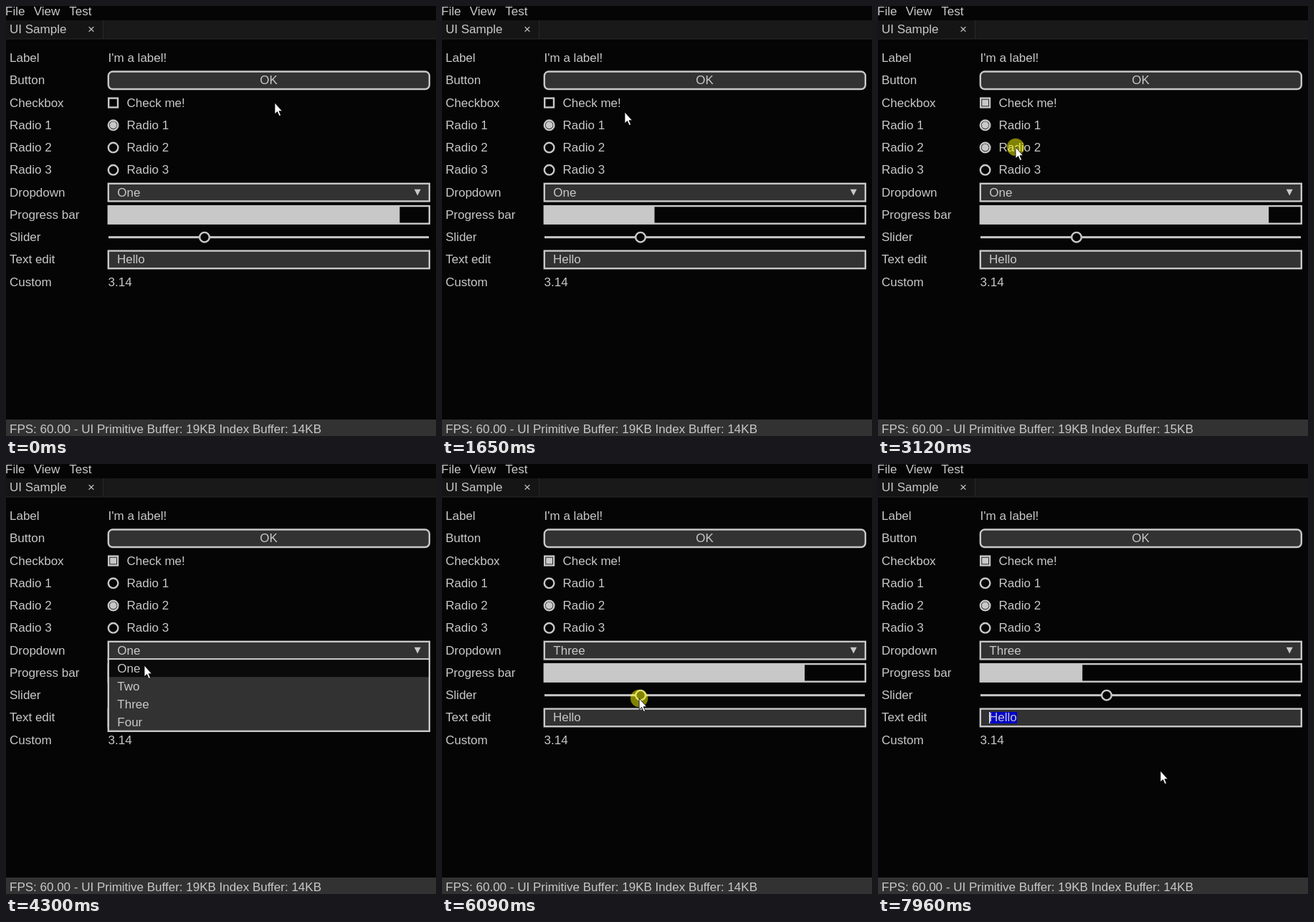
An HTML page for the animation above (8000 ms loop, 600 by 600 pixels).

```html
<!DOCTYPE html>
<html lang="en">
<head>
<meta charset="utf-8">
<title>UI Sample</title>
<style>
  html, body { margin: 0; width: 100%; height: 100%; overflow: hidden; background: #050505; }
  svg { display: block; width: 100vw; height: 100vh; }
  text { font: 17px "Liberation Sans", Arial, sans-serif; fill: #c8c8c8; white-space: pre; }
</style>
</head>
<body>
<svg id="stage" viewBox="0 0 600 600"></svg>
<script>
const LOOP = 8000;
const LIGHT = '#c8c8c8', FACE = '#323232', DARK = '#0a0a0a', BACK = '#050505';
const LEFT = 143, WIDTH = 447;
const TEXT_LEFT = 155, TEXT_RIGHT = 194;
const stage = document.getElementById('stage');

function add(tag, attrs, parent = stage) {
  const node = document.createElementNS('http://www.w3.org/2000/svg', tag);
  set(node, attrs);
  return parent.appendChild(node);
}
function set(node, attrs) {
  for (const name in attrs) node.setAttribute(name, attrs[name]);
}
function label(x, y, content, parent = stage, anchor = 'start') {
  const node = add('text', { x, y, 'text-anchor': anchor }, parent);
  node.textContent = content;
  return node;
}
const rowY = row => 72.5 + 31.27 * row;
const baseline = row => Math.round(rowY(row) + 5.5);
const rowLabel = (x, row, content, anchor) => label(x, baseline(row), content, stage, anchor);
const outline = fill => ({ fill, stroke: LIGHT, 'stroke-width': 2.4 });
const box = (x, y, width, height, fill, parent) => add('rect', { x, y, width, height, fill }, parent);
const frame = (y, height, fill, rx = 0, parent) =>
  add('rect', { x: 142.8, y, width: 448, height, rx, ...outline(fill) }, parent);
const rowFrame = (row, fill, rx) => frame(rowY(row) - 12.3, 24.6, fill, rx);
const ring = (cx, cy) => add('circle', { cx, cy, r: 6.8, ...outline(BACK) });
const show = (node, on) => set(node, { display: on ? 'inline' : 'none' });

// Menu, tab strip and status bar
label(-1, 13, 'File');
label(38.7, 13, 'View');
label(88.3, 13, 'Test');
box(0, 20, 600, 26, '#191919');
box(0, 20, 135, 26, '#151515');
box(135, 20, 1, 26, '#282828');
box(0, 45.5, 600, 1, '#282828');
label(5, 38, 'UI Sample');
label(119, 38, '×', stage, 'middle');
box(0, 577, 600, 23, FACE);
const status = label(5, 596, '');

['Label', 'Button', 'Checkbox', 'Radio 1', 'Radio 2', 'Radio 3', 'Dropdown',
 'Progress bar', 'Slider', 'Text edit', 'Custom'].forEach((name, row) => rowLabel(5, row, name));
rowLabel(142.6, 0, "I'm a label!");
rowLabel(142.6, 10, '3.14');

const button = rowFrame(1, FACE, 6);
rowLabel(366.5, 1, 'OK', 'middle');

add('rect', { x: 143.2, y: rowY(2) - 6.4, width: 12.8, height: 12.8, ...outline(BACK) });
const checkMark = box(145.2, rowY(2) - 4.4, 8.8, 8.8, LIGHT);
rowLabel(168.5, 2, 'Check me!');

const [dot1, dot2, dot3] = [1, 2, 3].map(i => {
  const cy = rowY(i + 2);
  ring(149.6, cy);
  rowLabel(168.5, i + 2, 'Radio ' + i);
  return add('circle', { cx: 149.6, cy, r: 5, fill: LIGHT });
});
show(dot3, false);

rowFrame(6, FACE);
const choice = rowLabel(155.3, 6, 'One');
add('path', { d: 'M569.7 255.8h9l-4.5 8.6z', fill: LIGHT });

rowFrame(7, BACK);
const bar = box(LEFT, rowY(7) - 12.3, 0, 24.6, LIGHT);

box(LEFT, rowY(8) - 1.5, WIDTH, 3, LIGHT);
const knob = ring(277, rowY(8));

rowFrame(9, FACE);
const selection = box(TEXT_LEFT, 346, 0, 16, '#0000c8');
rowLabel(155, 9, 'Hello');
const caret = box(TEXT_LEFT, 346, 1.3, 16, '#fff');

const ITEM = 25, POPUP_TOP = 272.4;
const popup = add('g', {});
frame(POPUP_TOP, 4 * ITEM + 0.4, FACE, 0, popup);
const hover = box(144, 0, 445.4, ITEM - 1, DARK, popup);
['One', 'Two', 'Three', 'Four'].forEach((name, i) => label(155.3, 291 + ITEM * i, name, popup));

const halo = add('circle', { r: 12.2, fill: '#ffff00', opacity: 0.5 });
const pointer = add('path', {
  d: 'M0 0V15.8L3.5 12.5l2.8 6 2.3-1L6 11.7H10.5z', fill: '#fff', stroke: '#000', 'stroke-width': 0.8
});

// The pointer's visits. A click is held until leaving, a drag while travelling there.
const HOLD = 230;
const visit = (arrive, leave, x, y, action) => ({ arrive, leave, x, y, action });
const tour = {
  start: visit(0, 180, 375, 135),
  button: visit(808, 1110, 380, 105, 'click'),
  detour: visit(1650, 1810, 255, 148),
  checkbox: visit(2050, 2420, 164, 135, 'click'),
  radio: visit(3040, 3290, 192, 197, 'click'),
  dropdown: visit(3700, 3900, 192, 258, 'click'),
  firstItem: visit(4300, 4360, 193, 281),
  thirdItem: visit(4610, 5080, 188.5, 333, 'click'),
  knob: visit(5940, 6080, 275, 327),
  knobEnd: visit(6400, 6500, 317, 327, 'drag'),
  text: visit(6810, 6950, 209, 350),
  textEnd: visit(7270, 7340, 41, 352, 'drag'),
  rest: visit(7850, LOOP, 394, 428)
};
const visits = Object.values(tour);

const clamp = (v, low, high) => Math.min(high, Math.max(low, v));
const ease = u => u * u * (3 - 2 * u);

function pointerAt(t) {
  const i = visits.findIndex(v => t < v.leave);
  const to = visits[i], from = visits[i - 1] || to;
  const u = ease(clamp((t - from.leave) / (to.arrive - from.leave || 1), 0, 1));
  return {
    x: i ? from.x + (to.x - from.x) * u : to.x,
    y: i ? from.y + (to.y - from.y) * u : to.y,
    held: to.action === 'drag' || (to.action === 'click' && t >= to.leave - HOLD) ? to : null
  };
}

function render(t) {
  const { x, y, held } = pointerAt(t);

  set(bar, { width: WIDTH * Math.abs(Math.sin(1.14 + t / 1000)) });
  set(button, { fill: held === tour.button ? DARK : FACE });
  show(checkMark, t >= tour.checkbox.leave - HOLD);
  show(dot1, t < tour.radio.leave);
  show(dot2, t >= tour.radio.leave - HOLD);
  status.textContent =
    `FPS: 60.00 - UI Primitive Buffer: 19KB Index Buffer: ${held === tour.radio ? 15 : 14}KB`;

  const item = Math.floor((y - POPUP_TOP) / ITEM);
  show(popup, t >= tour.dropdown.leave && t < tour.thirdItem.leave);
  show(hover, item >= 0);
  set(hover, { y: POPUP_TOP + 0.8 + ITEM * item });
  choice.textContent = t < tour.thirdItem.leave ? 'One' : 'Three';

  set(knob, { cx: 2 + pointerAt(clamp(t, tour.knob.leave, tour.knobEnd.arrive)).x });

  const editing = t - tour.text.leave;
  const caretX = clamp(pointerAt(Math.min(t, tour.textEnd.arrive)).x, TEXT_LEFT, TEXT_RIGHT);
  show(selection, editing >= 0);
  set(selection, { x: caretX, width: TEXT_RIGHT - caretX });
  show(caret, editing >= 0 && Math.floor(editing / 500) % 2 === 0);
  set(caret, { x: caretX });

  show(halo, held);
  set(halo, { cx: x, cy: y });
  set(pointer, { transform: `translate(${x} ${y})` });
}

function loop() {
  render(performance.now() % LOOP);
  requestAnimationFrame(loop);
}
loop();
</script>
</body>
</html>
```
